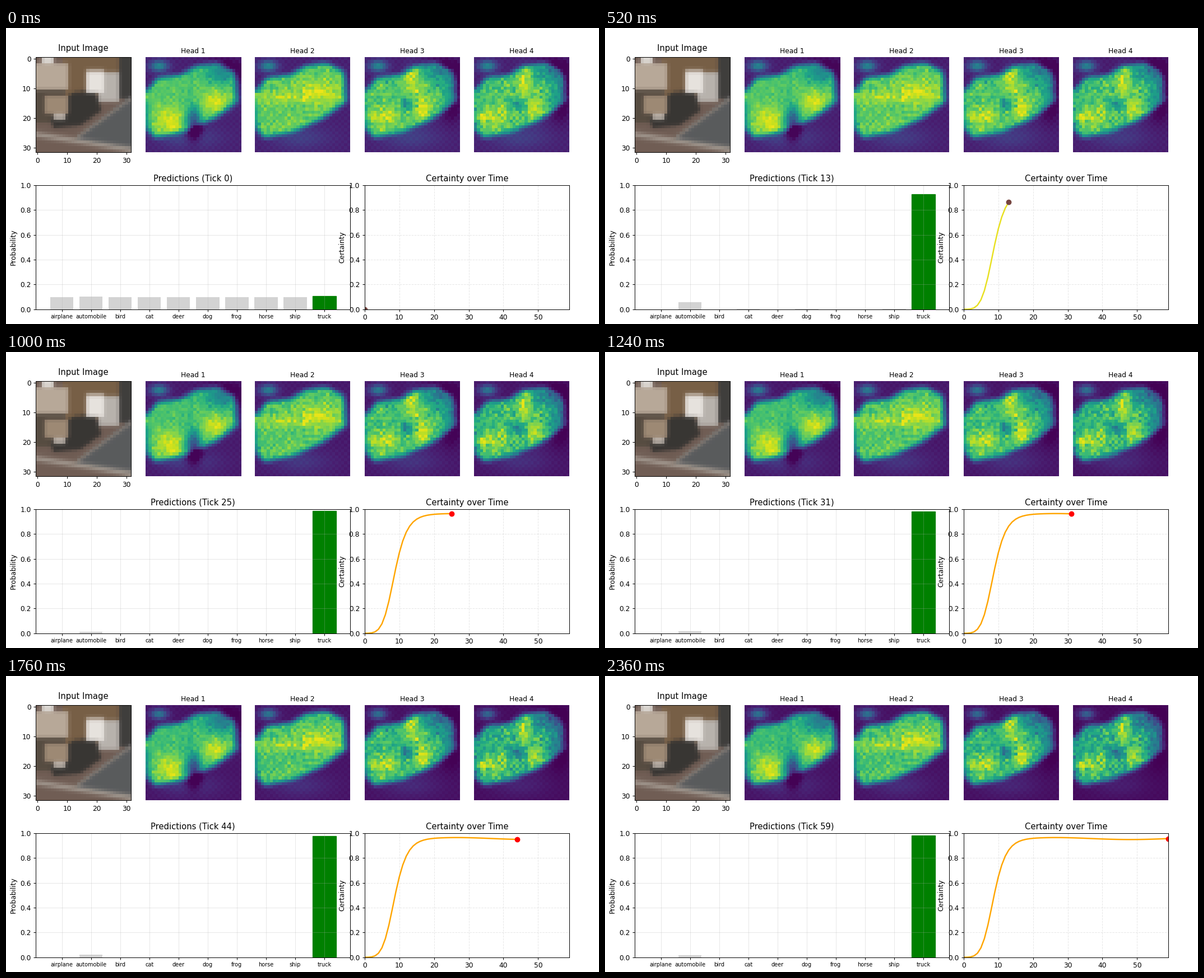
A matplotlib script that plays this animation: 1058x529 px, repeating every 2.4 s.

```python
import numpy as np
import matplotlib.pyplot as plt
from matplotlib.animation import FuncAnimation
from matplotlib.path import Path

W, H, TICKS, N = 1058, 529, 60, 32
LABELS = ["airplane", "automobile", "bird", "cat", "deer",
          "dog", "frog", "horse", "ship", "truck"]
rng = np.random.default_rng(7)
yy, xx = np.mgrid[0:N, 0:N] + 0.5


def cover(poly, k=4):
    """Share of each cell that lies inside the polygon."""
    c = (np.arange(N * k) + 0.5) / k
    gx, gy = np.meshgrid(c, c)
    inside = Path(poly).contains_points(np.c_[gx.ravel(), gy.ravel()])
    return inside.reshape(N, k, N, k).mean(axis=(1, 3))


def box(x0, y0, x1, y1):
    return cover([(x0, y0), (x1, y0), (x1, y1), (x0, y1)])


def stripe(y0, slope, width):
    return np.exp(-((yy - y0 - slope * xx) / width) ** 2)


def soften(a):
    """3x3 binomial blur over the first two axes."""
    for axis in (0, 1):
        n = a.shape[axis]
        i = np.arange(n)
        a = (a.take(np.maximum(i - 1, 0), axis) + 2 * a
             + a.take(np.minimum(i + 1, n - 1), axis)) / 4
    return a


def bump(x, y, sx, sy, amp):
    return amp * np.exp(-((xx - x) / sx) ** 2 - ((yy - y) / sy) ** 2)


def scene():
    """Flat blocks, each with a lightness and a warmth."""
    road = cover([(13, 28), (32, 13), (32, 31)])
    shade = cover([(5, 21), (12, 12), (20, 11), (22, 18), (15, 23), (6, 24)])
    layers = [
        (box(9, 0, 28, 13), 95, 0.26),
        (box(28, 0, 32, 14), 62, 0.02),
        (road, 91, -0.02),
        (box(0, 11, 10, 22), 76, 0.14),
        (box(0, 2, 11, 11), 168, 0.09),
        (box(2, 0, 6, 2), 216, 0.02),
        (shade, 54, 0.05),
        (box(3, 13, 11, 19), 137, 0.15),
        (box(6, 19, 10, 21), 175, 0.05),
        (box(21, 5, 28, 15), 178, 0.03),
        (box(17, 4.5, 23, 12), 226, 0.02),
        (stripe(37, -0.72, 0.7) * (xx > 14), 126, 0.05),
        (stripe(26, 0.16, 0.9), 155, 0.06),
    ]
    img = np.ones((N, N, 3)) * (112, 93, 84)
    for alpha, light, warm in layers:
        a = alpha[..., None]
        img = img * (1 - a) + a * light * np.array([1 + warm, 1, 1 - warm])
    return np.clip((img + soften(img)) / 510, 0, 1)


BODY = [(0, 12), (4, 7), (12, 6), (17, 3), (24, 2), (30, 5), (30.5, 15),
        (23, 20.5), (13, 25), (3, 27), (0.5, 24)]
CORNER = (26, 5, 6, 3.5, -0.25)
EDGE = (29, 13, 3, 7, -0.2)


def cab(dx):
    return [(6, 20, 6, 3, 0.17), (16 + dx, 8, 2.5, 5, 0.2),
            (19.5 + dx, 17, 2.5, 4.5, 0.2), (14 + dx, 16, 2, 2, -0.25), CORNER, EDGE]


def heat(level, rough, spots):
    mask = soften(cover(BODY))
    v = 0.09 + (level - 0.09) * mask
    v += bump(4.5, 3, 3, 1.8, 0.38) + bump(15, 27, 10, 4, 0.1)
    v += sum(bump(*s) for s in spots)
    v += mask * rng.normal(0, rough, (N, N))
    v += 0.012 * (-1.0) ** (np.floor(xx) + np.floor(yy))
    return np.clip(v, 0.015, 0.97)


HEADS = [
    heat(0.73, 0.03, [(8, 21, 5, 5, 0.2), (23, 15, 5, 3.5, 0.22),
                      (16, 22, 2.5, 5, -0.5), CORNER]),
    heat(0.76, 0.04, [(22, 12, 8, 3.5, 0.17), (8, 13.5, 8, 1.5, 0.12)]),
    heat(0.73, 0.05, cab(0)),
    heat(0.72, 0.06, cab(1)),
]
FADES = [0.25, 0.25, 0.35, 0.5]

# Sigmoid rise, then a shallow dip
t_all = np.arange(TICKS)
rise = 1 / (1 + np.exp(8.47 - 3.1 * np.log(t_all + 1e-9) - 0.204 * t_all))
dip = 0.0085 * (1 - np.cos(2 * np.pi * np.maximum(t_all - 25, 0) / 46))
certainty = 0.967 * rise - dip

LOGITS = np.log([.02, .172, .025, .05, .02, .03, .025, .02, .05, .60])


def softmax(s):
    e = np.exp(s * (LOGITS - LOGITS.max()))
    return e / e.sum()


def class_probs(c):
    """Sharpen the logits until 1 - normalised entropy equals c."""
    lo, hi = 0.02, 8.0
    for _ in range(30):
        s = (lo + hi) / 2
        p = softmax(s)
        if 1 + (p * np.log(p + 1e-12)).sum() / np.log(10) < c:
            lo = s
        else:
            hi = s
    return softmax(lo)


probs = [class_probs(c) for c in certainty]

fig = plt.figure(figsize=(12, 6), dpi=W / 12, facecolor="white")


def panel(x, y, w, h):
    return fig.add_axes([x / W, 1 - (y + h) / H, w / W, h / H])


SIDE, STEP, LEFT, TOP = 170, 195.5, 53.2, 52.2
LOW, TALL = 281.2, 221.5

ax_in = panel(LEFT, TOP, SIDE, SIDE)
ax_in.imshow(scene(), interpolation="nearest")
ax_in.set_title("Input Image", pad=9.5)
ax_in.set_xticks(range(0, 31, 10))
ax_in.set_yticks(range(0, 31, 10))

maps = []
for i, v in enumerate(HEADS):
    ax = panel(LEFT + STEP * (i + 1), TOP, SIDE, SIDE)
    maps.append(ax.imshow(v, cmap="viridis", vmin=0, vmax=1, interpolation="nearest"))
    ax.set_title(f"Head {i + 1}", fontsize=10)
    ax.axis("off")

ax_bar = panel(LEFT, LOW, STEP * 2 + SIDE, TALL)
bars = ax_bar.bar(range(10), probs[0], color="lightgray")
bars[-1].set(facecolor="green", edgecolor="green", linewidth=1)
ax_bar.set(ylim=(0, 1), xlim=(-0.89, 9.89), ylabel="Probability")
ax_bar.set_xticks(range(10), LABELS, fontsize=8)
ax_bar.grid(alpha=0.3)
bar_title = ax_bar.set_title("")

ax_cert = panel(LEFT + STEP * 3, LOW, STEP + SIDE, TALL)
ax_cert.set(xlim=(0, TICKS - 1), ylim=(0, 1), ylabel="Certainty", xlabel="Tick")
ax_cert.set_title("Certainty over Time")
ax_cert.grid(alpha=0.3, linestyle="--")
line, = ax_cert.plot([], [], lw=2)
dot, = ax_cert.plot([], [], "o", ms=7)


def colors(t):
    """Line and dot colours: early, middle and settled phase."""
    if t < 14:
        return ("#e8e020" if t else "orange"), "#764540"
    return "orange", "orange" if t < 25 else "red"


def draw(t):
    u = np.clip((t - 8) / 44, 0, 1)
    for im, v, fade in zip(maps, HEADS, FADES):
        im.set_data(v ** (1 + fade * u))
    for bar, p in zip(bars, probs[t]):
        bar.set_height(p)
    bar_title.set_text(f"Predictions (Tick {t})")
    line_color, dot_color = colors(t)
    line.set_data(t_all[:t + 1], certainty[:t + 1])
    line.set_color(line_color)
    dot.set_data([t], [certainty[t]])
    dot.set_color(dot_color)
    return [*maps, *bars, bar_title, line, dot]


anim = FuncAnimation(fig, draw, frames=TICKS, interval=40, repeat=True, repeat_delay=0)
plt.show()
```
